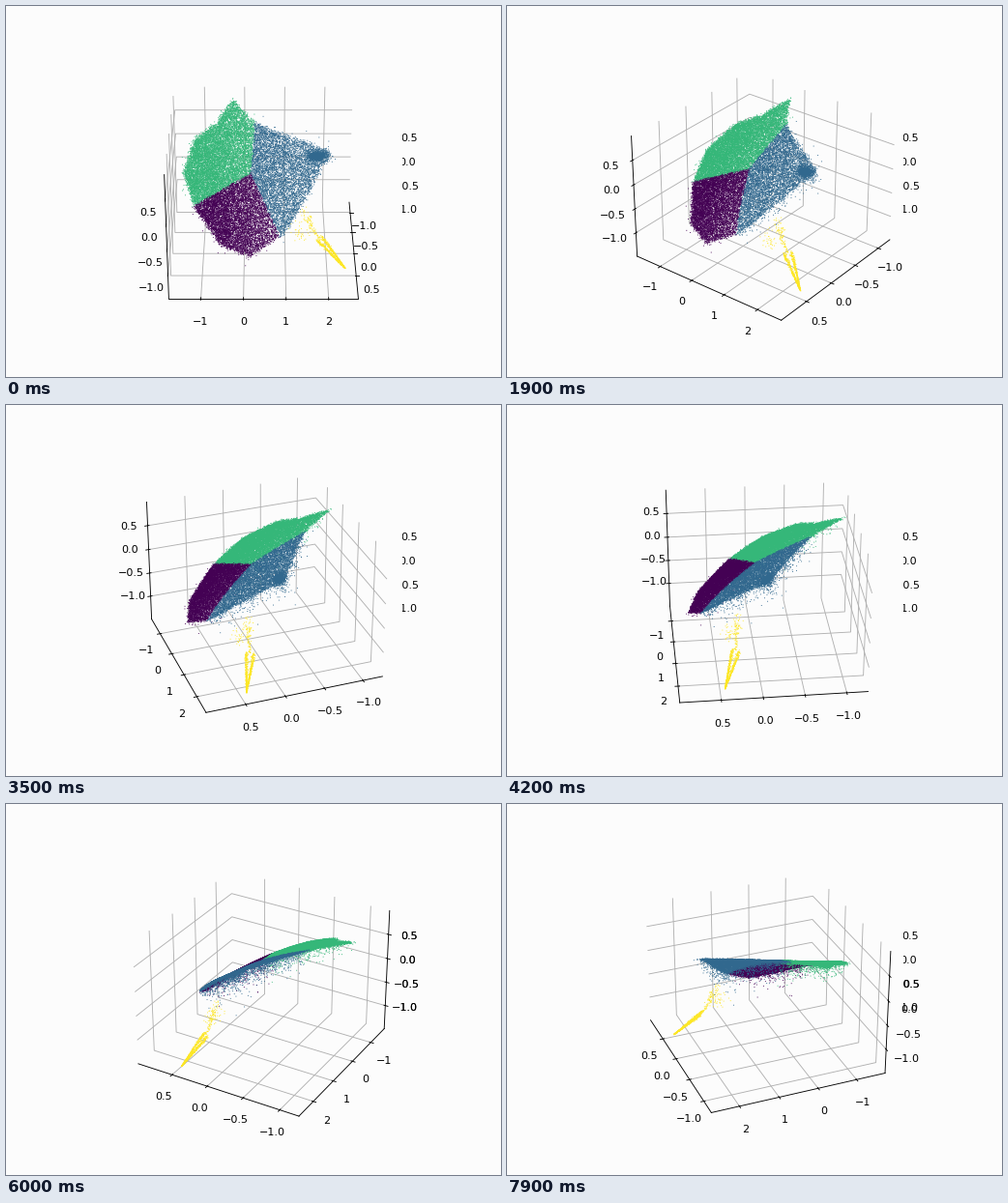
Recreate the animation shown at these times as a matplotlib script. Size 512 px wide and 384 px high, loop 8 s.

```python
import numpy as np
import matplotlib.pyplot as plt
from matplotlib.animation import FuncAnimation
from matplotlib.patches import Rectangle
from matplotlib.path import Path

BG = "#fcfcfc"
FRAMES = 80
LIMS = np.array([(-1.256, 0.992), (-1.7535, 2.6965), (-1.505, 0.984)])
BOX = np.array([1.1905, 1.1905, 0.8929])  # size of the axes cube in view units
HALVES = np.arange(-1, 0.6, 0.5)
NORMAL = np.array([0.46, -0.19, 0.87])  # roughly upright on the sheet
PALETTE = plt.cm.viridis(np.linspace(0, 1, 4))
PURPLE, BLUE, GREEN, YELLOW = range(4)

# Front view in pixels: corners of the cloud and the point where clusters meet
OUTLINE = [(234, 97), (258, 121), (335, 150), (296, 222), (283, 238), (252, 259),
           (222, 247), (195, 207), (184, 172), (195, 138), (219, 120)]
JUNCTION = np.array([253, 173])

rng = np.random.default_rng(4)


def cloud(n):
    """Points inside the outline, densest on the left, with a soft fringe."""
    pts = rng.uniform(np.min(OUTLINE, 0), np.max(OUTLINE, 0), (n * 6, 2))
    density = 0.35 + 0.65 / (1 + np.exp((pts[:, 0] - 238) / 16))
    keep = Path(OUTLINE).contains_points(pts) & (rng.random(len(pts)) < density)
    pts = pts[keep][:n]
    blur = np.where(rng.random(len(pts)) < 0.07, 4, 1.1)
    return pts + rng.normal(size=pts.shape) * blur[:, None]


def cluster(pts):
    """Three sectors around the junction."""
    dx, dy = (pts - JUNCTION + rng.normal(0, 0.8, pts.shape)).T
    angle = np.degrees(np.arctan2(dy, dx)) % 360
    return np.select([(angle > 65) & (angle < 150), (angle >= 150) & (angle < 275)],
                     [PURPLE, GREEN], BLUE)


def lift(pts):
    """Place front-view pixels on the curved sheet."""
    u0 = (pts[:, 0] - 266.4) / 159.8
    v0 = (189.9 - pts[:, 1]) / 159.8
    w = np.zeros(len(pts))
    for _ in range(3):
        u, v = u0 * (1 - w / 10), v0 * (1 - w / 10)
        w = 0.176 - 0.493 * v - 0.31 * v**2 + 0.2 * (u + 0.08) * (1 + v)
    return np.column_stack([0.866 * w - 0.5 * v, u, 0.5 * w + 0.866 * v])


def strand(a, b, n, blur):
    """Points from a to b that draw together towards b."""
    t = rng.random((n, 1))
    a, b = np.array(a), np.array(b)
    return a + (b - a) * t + rng.normal(0, blur, (n, 3)) * (1 - 0.8 * t)


# The sheet, with some points hanging below it, mostly blue ones
knot = rng.normal((322, 154.5), (5.5, 2.6), (900, 2))
flat = np.vstack([cloud(27000), knot])
label = cluster(flat)
sheet = lift(flat)
loose = rng.random(len(flat)) < np.where(label == BLUE, 0.22, 0.05)
drop = np.abs(rng.normal(0, 0.005, len(flat)))
drop += loose * rng.exponential(0.028, len(flat))
sheet -= drop[:, None] * NORMAL

# The tail: a sparse start that splits in two strands meeting at the tip
start, mid, tip = (0.2, 0.25, -0.05), (0.22, 0.36, -0.235), (0.305, 0.525, -0.41)
tail = [strand(start, mid, 90, 0.016), rng.normal((0.25, 0.23, -0.17), 0.03, (35, 3))]
for side in (-1, 1):
    tail.append(strand(np.add(mid, (0.02 * side, -0.015 * side, 0)), tip, 330, 0.006))
tail = np.vstack(tail)

points = np.vstack([sheet, tail]) * np.ptp(LIMS, axis=1) / BOX + LIMS.mean(1)
colors = PALETTE[np.append(label, np.full(len(tail), YELLOW))]

fig = plt.figure(figsize=(6.4, 4.8), dpi=80, facecolor=BG)


def cube(zorder, xticks, yticks):
    ax = fig.add_subplot(projection="3d", facecolor="none", zorder=zorder)
    for axis in (ax.xaxis, ax.yaxis, ax.zaxis):
        axis.set_pane_color(BG)
    ax.set_xticks(xticks)
    ax.set_yticks(yticks)
    ax.set_zticks(HALVES)
    return ax


def set_limits(ax):
    ax.set_xlim(*LIMS[0])
    ax.set_ylim(*LIMS[1])
    ax.set_zlim(*LIMS[2])


# Leftover labels of the default view stay visible right of the axes area
ghost = cube(-2, [], [])
set_limits(ghost)
ghost.view_init(30, -60)
fig.add_artist(Rectangle((0.22375, 0.11), 0.5775, 0.77, transform=fig.transFigure,
                         facecolor=BG, linewidth=0, zorder=-1))

ax = cube(0, HALVES, range(-1, 3))
ax.scatter(*points.T, c=colors, s=0.65, marker="s", linewidths=0,
           depthshade=False, snap=False)
set_limits(ax)

# Two degrees per step, kept just off 0 and 90 where the panes swap sides
azims = np.linspace(1e-6, 158 - 1e-5, FRAMES)


def update(i):
    ax.view_init(30, azims[i])
    return []


anim = FuncAnimation(fig, update, frames=FRAMES, interval=100, repeat=True,
                     repeat_delay=0, blit=False)
plt.show()
```
